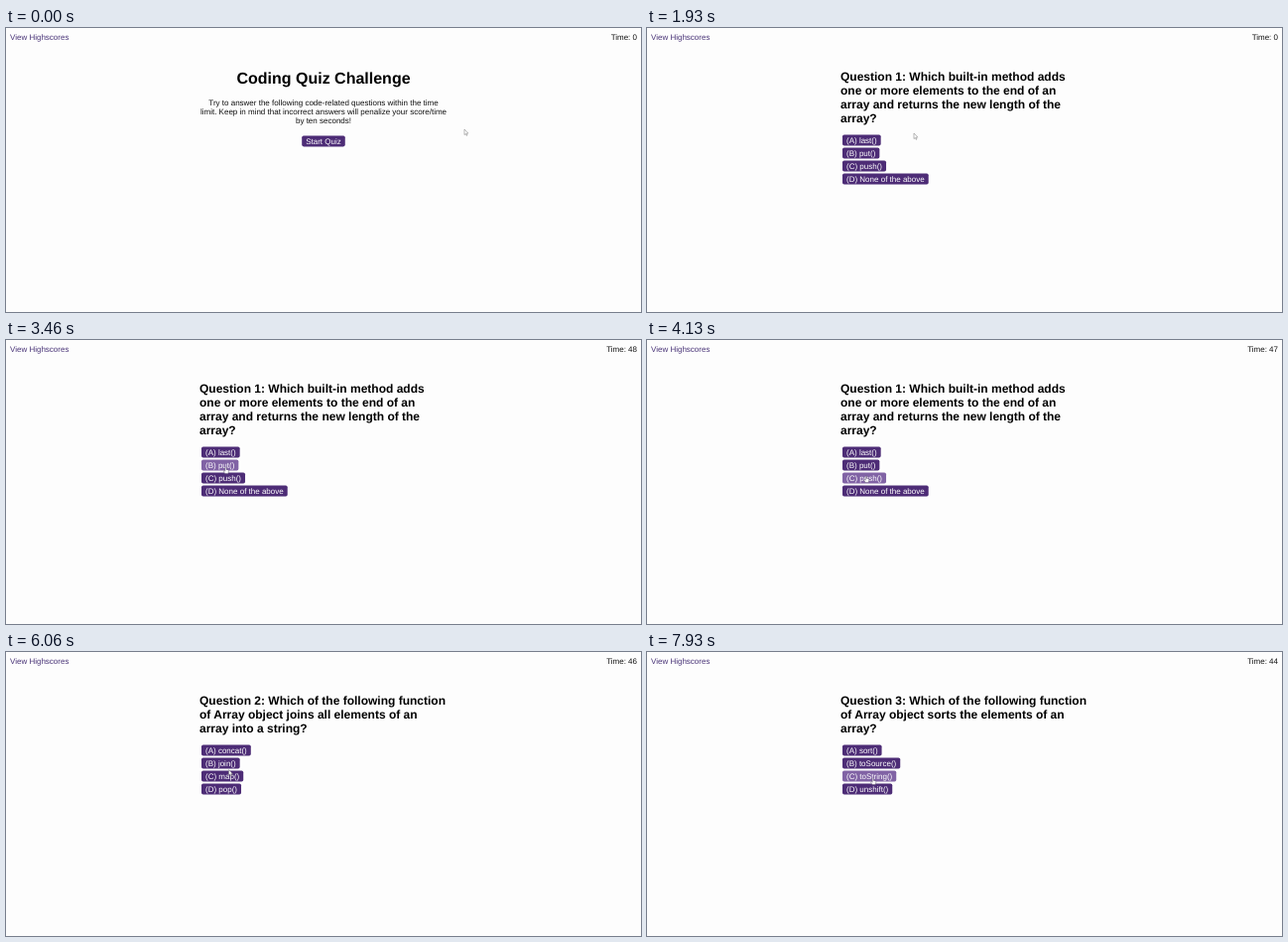
Animation of 640x286 px, one loop 8 s. Source, as an HTML page:

```html
<!DOCTYPE html>
<html lang="en">
<head>
<meta charset="utf-8">
<title>Coding Quiz</title>
<style>
html, body { margin: 0; width: 100%; height: 100%; overflow: hidden; background: #fdfdfd; }
svg { display: block; width: 640px; height: 286px; }
text { font: 8px "Liberation Sans", Arial, sans-serif; fill: #111; white-space: pre; text-rendering: geometricPrecision; }
.link { fill: #4a3578; }
.title { font-size: 16px; font-weight: bold; fill: #000; }
.ask { font-size: 12px; font-weight: bold; fill: #000; }
.label { fill: #fff; }
.mid { text-anchor: middle; }
.end { text-anchor: end; }
</style>
</head>
<body>
<svg id="stage" viewBox="0 0 640 286"></svg>
<script>
const LOOP = 8000;
const DARK = '#4d2c76', LIGHT = '#8163a5';
const svg = document.getElementById('stage');

function add(parent, tag, attrs, text) {
  const el = document.createElementNS('http://www.w3.org/2000/svg', tag);
  for (const k in attrs) el.setAttribute(k, attrs[k]);
  if (text) el.textContent = text;
  parent.appendChild(el);
  return el;
}

function addButton(parent, label, x, cy) {
  const rect = add(parent, 'rect', { x, y: cy - 5.5, height: 11, rx: 1.8, fill: DARK });
  const text = add(parent, 'text', { x: x + 4, y: cy + 2.6, class: 'label' }, label);
  const w = text.getComputedTextLength() + 8;
  rect.setAttribute('width', w);
  return { rect, x, w, y: cy - 5.5 };
}

function addQuestion(start, lines, answers) {
  const g = add(svg, 'g', {});
  lines.forEach((s, i) => add(g, 'text', { x: 195, y: 52.5 + 14 * i, class: 'ask' }, s));
  const top = 57 + 14 * lines.length;
  const buttons = answers.map((s, i) =>
    addButton(g, `(${'ABCD'[i]}) ${s}`, 197, top + 13 * i));
  return { start, g, buttons };
}

function addIntro() {
  const g = add(svg, 'g', {});
  add(g, 'text', { x: 320, y: 56, class: 'title mid' }, 'Coding Quiz Challenge');
  ['Try to answer the following code-related questions within the time',
   'limit. Keep in mind that incorrect answers will penalize your score/time',
   'by ten seconds!'
  ].forEach((s, i) => add(g, 'text', { x: 320, y: 77.8 + 9.2 * i, class: 'mid' }, s));
  return { start: 0, g, buttons: [addButton(g, 'Start Quiz', 298.2, 113.9)] };
}

add(svg, 'text', { x: 4, y: 11.6, class: 'link' }, 'View Highscores');
const clock = add(svg, 'text', { x: 636, y: 11.6, class: 'end' }, 'Time: 0');

const screens = [
  addIntro(),
  addQuestion(1060,
    ['Question 1: Which built-in method adds', 'one or more elements to the end of an',
     'array and returns the new length of the', 'array?'],
    ['last()', 'put()', 'push()', 'None of the above']),
  addQuestion(4800,
    ['Question 2: Which of the following function', 'of Array object joins all elements of an',
     'array into a string?'],
    ['concat()', 'join()', 'map()', 'pop()']),
  addQuestion(6530,
    ['Question 3: Which of the following function', 'of Array object sorts the elements of an',
     'array?'],
    ['sort()', 'toSource()', 'toString()', 'unshift()'])
];

const arrow = add(svg, 'path', {
  d: 'M0 0V5.6L1.3 4.4L2.2 6.4L3 6L2.2 4.1H3.9Z',
  fill: '#fff', stroke: '#777', 'stroke-width': 0.5
});
const hand = add(svg, 'path', {
  d: 'M-.6 .4Q0-.3 .6 .4V2.4L2.6 2.9Q3.2 3.2 3 4.2L2.4 6.4H-.8L-2.3 4.1Q-2.2 3.3-1.4 3.6L-.6 4.2Z',
  fill: '#fff', stroke: '#4a4058', 'stroke-width': 0.4
});

// time, x, y of the pointer tip
const path = [
  [0, 462, 102], [60, 462, 102], [660, 321, 113], [1600, 321, 113],
  [1930, 269, 106], [2400, 226, 122], [2530, 226, 122], [3330, 221.5, 128],
  [3600, 221.5, 128], [4330, 220.7, 139], [4980, 220.7, 139], [5600, 224.5, 118.6],
  [6080, 224.5, 118.6], [6460, 230.5, 115], [7399, 230.5, 115], [7400, 231, 116],
  [7929, 231, 116], [7930, 227.8, 127], [LOOP, 227.8, 127]
];

function pointer(t) {
  let i = 1;
  while (i < path.length - 1 && t >= path[i][0]) i++;
  const [t0, x0, y0] = path[i - 1], [t1, x1, y1] = path[i];
  const u = (t - t0) / (t1 - t0);
  const e = u * u * (3 - 2 * u);
  return [x0 + (x1 - x0) * e, y0 + (y1 - y0) * e];
}

function timeLeft(t) {
  return t < 2100 ? 0 : 49 - Math.floor((t - 2100) / 1007);
}

function draw(t) {
  const [x, y] = pointer(t);
  const current = screens.filter(s => t >= s.start).pop();
  for (const s of screens) s.g.setAttribute('display', s === current ? 'inline' : 'none');

  const over = current.buttons.findIndex(b =>
    x >= b.x && x <= b.x + b.w && y >= b.y && y <= b.y + 11);
  // a clicked button stays lit until the pointer moves again
  const lit = t >= 4800 && t < 4980 ? 2 : over;
  current.buttons.forEach((b, i) => b.rect.setAttribute('fill', i === lit ? LIGHT : DARK));

  clock.textContent = 'Time: ' + timeLeft(t);
  const at = `translate(${x} ${y})`;
  arrow.setAttribute('transform', at);
  hand.setAttribute('transform', at);
  arrow.setAttribute('display', over < 0 ? 'inline' : 'none');
  hand.setAttribute('display', over < 0 ? 'none' : 'inline');
}

const begin = performance.now();
function tick() {
  draw((performance.now() - begin) % LOOP);
  requestAnimationFrame(tick);
}
tick();
</script>
</body>
</html>
```
